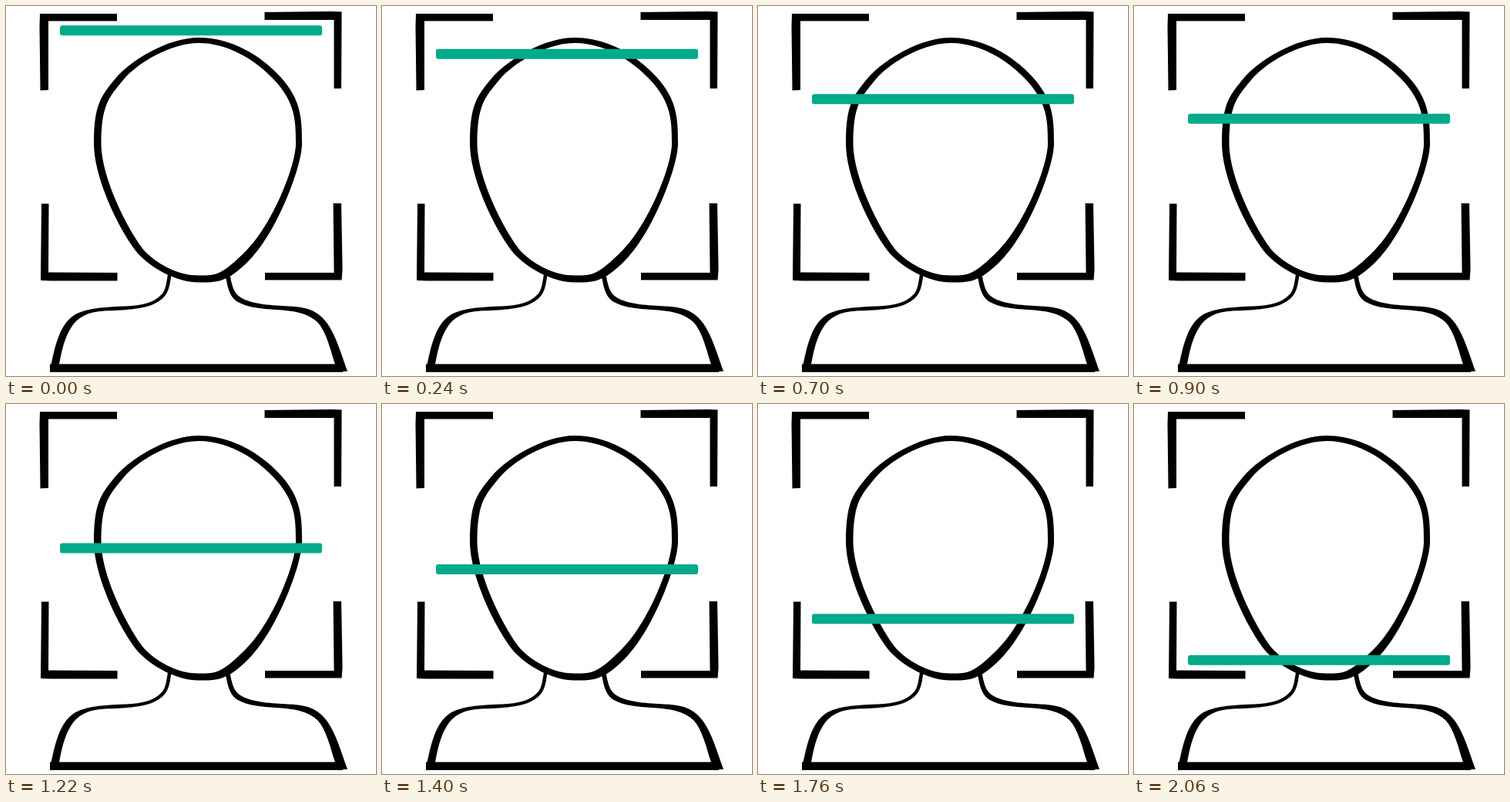
Recreate the animation shown at these times as an HTML page. Size 480 by 480 pixels, loop 2.08 s.

```html
<!DOCTYPE html>
<html lang="en">
<head>
<meta charset="utf-8">
<title>Face scan</title>
<style>
  html, body { margin: 0; width: 100%; height: 100%; overflow: hidden; background: #fff; }
  svg { display: block; width: 100%; height: 100%; }
</style>
</head>
<body>
<svg viewBox="0 0 480 480">
  <g id="corners">
    <path d="M44 10H144V19.5H55V109L44.5 109.5L43.5 26Z"/>
    <path d="M335.5 8L422 7L435.5 7.5L435 107H425.5V18H335.5Z"/>
    <path d="M46 256.5H55.5L55 345.5L144.5 346V356.5H58L45 356Z"/>
    <path d="M424.5 256H435L436.5 342L435.5 355.5H336V346H425.5Z"/>
  </g>
  <g id="body">
    <path d="M210 348C208 360 207 369 202 374C192 385 177 388.5 155 389.500C132 390.500 107 391 90 400C70 412 64 439 58 468H68.500C72 447 76 431 84 418C92 404 106 396.500 128 395.500C151 394.500 177 394 193 386C209 378 212 369 214.500 348Z"/>
    <path d="M284 346C287 362 289 376 299 383C313 391.500 333 393 350 394C374 395 392 399 404 410C416 423 420 444 428 468L436 474H443C434 449 429 430 417 412C405 395 390 390.500 367 389.500C346 388.500 320 387 306 379C295 373 293 363 289.500 343Z"/>
    <path d="M57 464.500H437V475H57Z"/>
  </g>
  <g id="head">
    <path d="M250 41C292 41 331 64 357 93S384 147 384 178S352 290 320 325S274 358.500 249 358.500S193 343 174 324S114 229 114 178S124 116 142 94S209 41 250 41Z"/>
    <path fill="#fff" d="M250 48C285 48 321 67 348 96S376 148 376 178S345 284 312 317S273 349.500 249 349.500S198 336 182 320S123.500 228 123.500 178S134 118 152 96S214 48 250 48Z"/>
  </g>
  <rect id="bar" x="70" width="340" height="13" rx="3" fill="#02ab89"/>
</svg>
<script>
const LOOP = 2080, STEP = 20;
const START_Y = 25.2, SPEED_UP_AT = 1310;
const SLOW = 0.1272, FAST = 0.1787; // pixels per ms

const bar = document.getElementById('bar');

const barY = t =>
  START_Y + SLOW * Math.min(t, SPEED_UP_AT) + FAST * Math.max(0, t - SPEED_UP_AT);

function draw(now) {
  const t = Math.floor((now % LOOP) / STEP) * STEP;
  bar.setAttribute('y', barY(t).toFixed(2));
}

let start;
function tick(now) {
  start ??= now;
  draw(now - start);
  requestAnimationFrame(tick);
}
draw(0);
requestAnimationFrame(tick);
</script>
</body>
</html>
```
